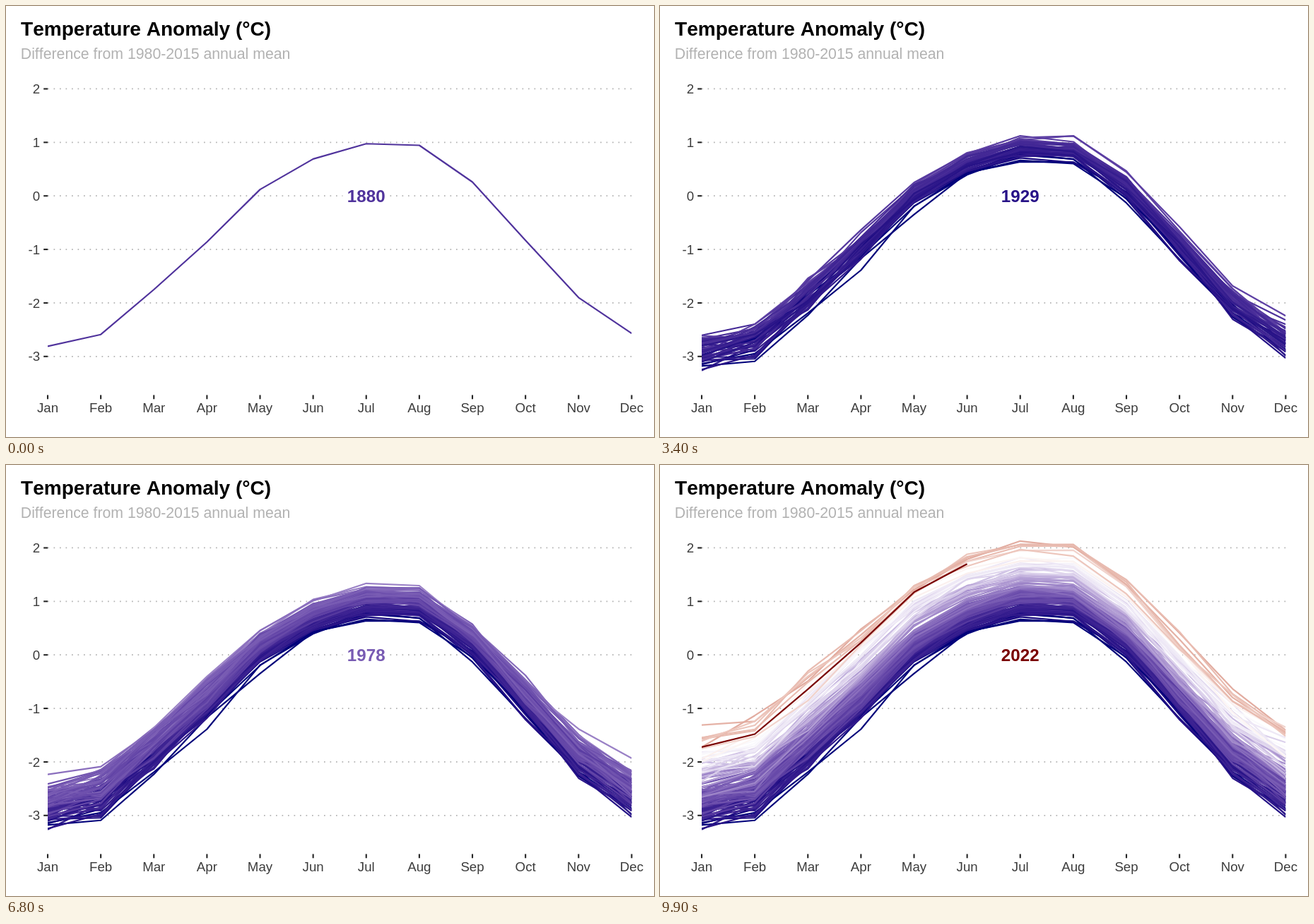
An HTML page with a canvas for the animation above (10000 ms loop, 917x611 px).

```html
<!DOCTYPE html>
<html lang="en">
<head>
<meta charset="utf-8">
<title>Temperature Anomaly</title>
<style>
  html, body { margin: 0; width: 100%; height: 100%; overflow: hidden; background: #fff; }
  canvas { display: block; }
</style>
</head>
<body>
<canvas id="chart" width="917" height="611"></canvas>
<script>
const ctx = document.getElementById('chart').getContext('2d');
const FONT = '"Liberation Sans", Arial, sans-serif';
const MONTHS = ['Jan', 'Feb', 'Mar', 'Apr', 'May', 'Jun', 'Jul', 'Aug', 'Sep', 'Oct', 'Nov', 'Dec'];
const FIRST = 1880, LAST = 2022, STEPS = 100, STEP_MS = 100;
const LEFT = 59, RIGHT = 885.4, BOTTOM = 551.5;

// Curve of the first year; later years rise and fall from it
const base = [-2.81, -2.59, -1.75, -0.86, 0.12, 0.69, 0.975, 0.945, 0.26, -0.83, -1.9, -2.57];

// Turning points of the yearly mean
const trend = [
  [1880, -0.17], [1887, -0.32], [1900, -0.11], [1909, -0.48], [1915, -0.24], [1921, -0.2],
  [1929, -0.36], [1944, 0.18], [1950, -0.12], [1962, 0.04], [1976, -0.05], [1990, 0.45],
  [1993, 0.25], [2002, 0.6], [2011, 0.61], [2014, 0.73], [2016, 1.01], [2022, 0.86]];

const xAt = m => LEFT + m * (RIGHT - LEFT) / 11;
const yAt = v => 269.2 - v * 75.87;
const wave = (m, peak) => Math.cos((m - peak) * Math.PI / 6);

let seed = 1880;
function random() {
  seed = (seed * 1664525 + 1013904223) % 4294967296;
  return seed / 4294967296;
}

function meanOf(year) {
  const i = trend.findIndex(([y]) => y >= year);
  const [y1, v1] = trend[i];
  if (y1 === year) return v1;
  const [y0, v0] = trend[i - 1];
  return v0 + (v1 - v0) * (year - y0) / (y1 - y0) + (random() - 0.5) * 0.15;
}

// Winter months scatter more and warm a little faster than summer ones
function makeYear(year, mean) {
  const calm = year === FIRST || year === LAST ? 0 : 1;
  const warmth = mean - trend[0][1];
  let drift = 0;
  const values = base.map((v, m) => {
    drift = 0.4 * drift + random() + random() + random() - 1.5;
    const noise = Math.max(-1.8, Math.min(1.8, 1.7 * drift));
    const spread = 0.105 + 0.045 * wave(m, 0);
    return v + warmth * (1 + 0.08 * wave(m, 1.5)) + calm * noise * spread;
  });
  return year === LAST ? values.slice(0, 6) : values;
}

// Diverging scale mixed in Lab: dark blue, white, dark red
function shade(t) {
  const end = t < 0 ? [14.75, 50.42, -68.68] : [28.09, 51.01, 41.29];
  const k = Math.min(1, Math.abs(t));
  const fy = (100 + (end[0] - 100) * k + 16) / 116;
  const cube = f => f > 6 / 29 ? f ** 3 : (f - 4 / 29) * 108 / 841;
  const X = 0.9505 * cube(fy + end[1] * k / 500);
  const Y = cube(fy);
  const Z = 1.089 * cube(fy - end[2] * k / 200);
  const rgb = [
    3.2406 * X - 1.5372 * Y - 0.4986 * Z,
    -0.9689 * X + 1.8758 * Y + 0.0415 * Z,
    0.0557 * X - 0.204 * Y + 1.057 * Z
  ].map(c => {
    c = Math.max(0, Math.min(1, c));
    const s = c > 0.0031308 ? 1.055 * c ** (1 / 2.4) - 0.055 : 12.92 * c;
    return Math.round(255 * s ** 1.22);
  });
  return `rgb(${rgb})`;
}

const years = Array.from({ length: LAST - FIRST + 1 }, (_, i) => {
  const year = FIRST + i;
  const mean = meanOf(year);
  return {
    label: String(year),
    values: makeYear(year, mean),
    color: shade(year === LAST ? 1 : (mean - 0.69) / 1.17)
  };
});

function text(str, x, y, font, color, align) {
  ctx.font = `${font} ${FONT}`;
  ctx.fillStyle = color;
  ctx.textAlign = align;
  ctx.fillText(str, x, y);
}

function line(points, color, width) {
  ctx.strokeStyle = color;
  ctx.lineWidth = width;
  ctx.beginPath();
  for (const [x, y] of points) ctx.lineTo(x, y);
  ctx.stroke();
}

function drawAxes() {
  for (let v = -3; v <= 2; v++) {
    const y = yAt(v);
    ctx.setLineDash([1.7, 6.8]);
    line([[LEFT, y], [RIGHT, y]], '#b3b3b3', 1.7);
    ctx.setLineDash([]);
    line([[53.2, y], [LEFT, y]], '#252525', 2.1);
    text(String(v), 48.2, y + 6.6, '18.7px', '#3c3c3c', 'right');
  }
  MONTHS.forEach((name, m) => {
    const x = xAt(m);
    line([[x, BOTTOM], [x, BOTTOM + 5.8]], '#252525', 2.1);
    text(name, x, 575.5, '18.7px', '#3c3c3c', 'center');
  });
}

function draw(step) {
  const last = Math.round(step * (LAST - FIRST) / (STEPS - 1));
  ctx.fillStyle = '#fff';
  ctx.fillRect(0, 0, 917, 611);
  ctx.lineJoin = 'round';
  ctx.fontKerning = 'none';
  text('Temperature Anomaly (°C)', 21, 41.6, 'bold 28.05px', '#000', 'left');
  text('Difference from 1980-2015 annual mean', 20.8, 74.7, '21.25px', '#b2b2b2', 'left');
  drawAxes();

  ctx.save();
  ctx.beginPath();
  ctx.rect(LEFT, 80, RIGHT - LEFT, BOTTOM - 80);
  ctx.clip();
  for (const year of years.slice(0, last + 1)) {
    line(year.values.map((v, m) => [xAt(m), yAt(v)]), year.color, 2.2);
  }
  ctx.restore();

  const mid = xAt(6);
  ctx.fillStyle = '#fff';
  ctx.fillRect(mid - 33.3, 253, 66.6, 33);
  text(years[last].label, mid, 278, 'bold 24.2px', years[last].color, 'center');
}

const start = performance.now();
let shown = -1;
function tick(now) {
  const step = Math.floor(Math.max(0, now - start) / STEP_MS) % STEPS;
  if (step !== shown) draw(shown = step);
  requestAnimationFrame(tick);
}
draw(shown = 0);
requestAnimationFrame(tick);
</script>
</body>
</html>
```
